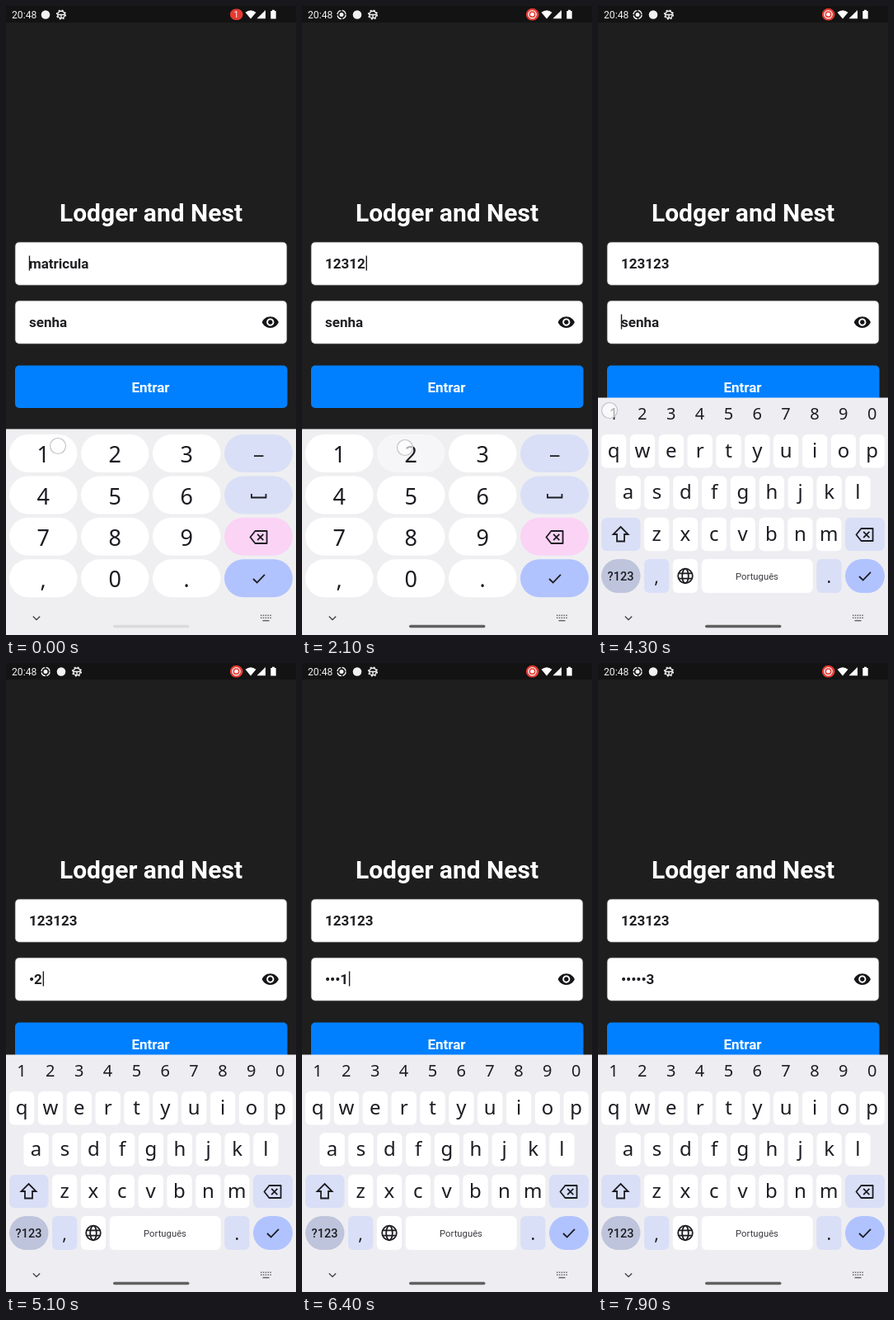
An HTML page that plays this animation: 352x762 px, repeating every 8 s.

```html
<!DOCTYPE html>
<html lang="pt">
<head>
<meta charset="utf-8">
<title>Login</title>
<style>
  html, body { margin: 0; width: 100%; height: 100%; overflow: hidden; background: #1e1e1e; }
  svg { display: block; width: 352px; height: 762px; }
  text { font-family: Roboto, sans-serif; }
  .bold { font-weight: 700; font-size: 17px; fill: #1f1f23; }
  .key { font-family: "Noto Sans", sans-serif; fill: #1c1c22; text-anchor: middle; }
  .mid { text-anchor: middle; }
  .line { fill: none; stroke: #1c1c22; stroke-width: 1.8; }
  .thin { fill: none; stroke: #f2f2f2; stroke-width: 1.4; }
</style>
</head>
<body>
<svg viewBox="0 0 352 762">
  <defs>
    <g id="back" class="line">
      <path d="M-10.5 0L-4.5-7.5H9.6V7.5H-4.5Z" stroke-linejoin="round"/>
      <path d="M-1.8-3.6L5.4 3.6M5.4-3.6L-1.8 3.6"/>
    </g>
    <path id="check" class="line" d="M-7 .5L-2.3 5L7-4.7"/>
  </defs>

  <rect width="352" height="762" fill="#1e1e1e"/>
  <rect width="352" height="20" fill="#131313"/>

  <!-- status bar -->
  <text x="7" y="15" font-size="12.2" fill="#f2f2f2">20:48</text>
  <g id="recNote">
    <circle class="thin" cx="48" cy="10.5" r="5" stroke-dasharray="6.4 1.45"/>
    <circle cx="48" cy="10.5" r="2.5" fill="#f2f2f2"/>
  </g>
  <g id="notes">
    <circle cx="48" cy="10.5" r="5.3" fill="#f2f2f2"/>
    <g transform="translate(67 10.5)">
      <circle class="thin" r="4.3"/>
      <circle class="thin" r="5.4" stroke-dasharray="2.1 2.14"/>
      <path class="thin" d="M-4 0H4M0 0V4" stroke-width="1.1"/>
    </g>
  </g>
  <rect x="272" y="3.5" width="15.5" height="13.5" rx="6.7" fill="#e53a32"/>
  <text id="count" class="mid" x="279.5" y="14" font-size="10.5" fill="#fff">1</text>
  <g id="recChip">
    <circle cx="279.5" cy="10.2" r="7.4" fill="#e53a32"/>
    <circle class="thin" cx="279.5" cy="10.2" r="4.6" stroke-width="1.1"/>
    <circle cx="279.5" cy="10.2" r="2.4" fill="#fff"/>
  </g>
  <path d="M290.5 7.8Q297 2.8 303.5 7.8L297 15.6ZM304.5 15.3L315 5V15.3ZM321.3 6H323V4.8H326V6H327.7V15.6H321.3Z" fill="#fff"/>

  <!-- form -->
  <text class="mid" x="176" y="260.5" font-size="30" font-weight="700" fill="#fff">Lodger and Nest</text>
  <g fill="#fff" stroke="#4b4b4b" stroke-width=".7">
    <rect x="11" y="286" width="330" height="52.3" rx="5"/>
    <rect x="11" y="357" width="330" height="52.3" rx="5"/>
  </g>
  <text id="user" class="bold" x="28" y="318"></text>
  <text id="pass" class="bold" x="28" y="389"></text>
  <rect id="caret" width="1.4" height="18" fill="#1c1c20"/>
  <path transform="translate(309.8 372) scale(.92)" fill="#151518" d="M12 4.5C7 4.5 2.73 7.61 1 12c1.73 4.39 6 7.5 11 7.5s9.27-3.11 11-7.5c-1.73-4.39-6-7.5-11-7.5zM12 17c-2.76 0-5-2.24-5-5s2.24-5 5-5 5 2.24 5 5-2.24 5-5 5zm0-8c-1.66 0-3 1.34-3 3s1.34 3 3 3 3-1.34 3-3-1.34-3-3-3z"/>
  <rect x="11" y="435.5" width="330.5" height="51.5" rx="5" fill="#0080ff"/>
  <text class="bold mid" x="175.5" y="468" style="fill:#fff">Entrar</text>

  <!-- keyboards -->
  <g id="numPad"><rect y="512.5" width="352" height="250" fill="#efeff1"/></g>
  <g id="letters"><rect y="474.5" width="352" height="288" fill="#eeeef2"/></g>

  <!-- navigation -->
  <path d="M32.8 739.5L37 743.5L41.2 739.5" fill="none" stroke="#47474c" stroke-width="1.4"/>
  <g stroke="#66666b" stroke-width="1.5">
    <path d="M309 738.3H322M309 741.3H322" stroke-dasharray="1.5 1.35"/>
    <path d="M311.5 744.6H319.5"/>
  </g>
  <rect id="pill" x="130" y="749.8" width="92.5" height="3.4" rx="1.7"/>

  <circle id="touch" r="9.5" fill="#fff" fill-opacity=".65" stroke="#c4c4c8" stroke-width="1.2"/>
</svg>

<script>
const $ = id => document.getElementById(id);
const LAVENDER = '#d9dff6', BLUE = '#b1c3ff', PINK = '#fbd3f5';

function add(parent, tag, attrs, text) {
  const node = document.createElementNS('http://www.w3.org/2000/svg', tag);
  for (const name in attrs) node.setAttribute(name, attrs[name]);
  if (text) node.textContent = text;
  parent.append(node);
  return node;
}
const box = (g, x, y, width, height, rx, fill = '#fff') =>
  add(g, 'rect', { x, y, width, height, rx, fill });
const glyph = (g, x, y, size, text) =>
  add(g, 'text', { class: 'key', x, y, 'font-size': size }, text);
const icon = (g, href, x, y) => add(g, 'use', { href, x, y });
const line = (g, d) => add(g, 'path', { class: 'line', d });

function buildNumPad(g) {
  const keys = {};
  ['123', '456', '789', ',0.'].forEach((row, r) => {
    const y = 519 + r * 50.4;
    [...row].forEach((ch, c) => {
      keys[ch] = box(g, 4 + c * 87, y, 82.5, 46, 23);
      glyph(g, 45.2 + c * 87, y + 34.2, 27, ch);
    });
    box(g, 265, y, 83, 46, 23, [LAVENDER, LAVENDER, PINK, BLUE][r]);
  });
  line(g, 'M301 545.2H312.5M298 591V595.5H315.5V591');
  icon(g, '#back', 307, 643.5);
  icon(g, '#check', 307, 693.5);
  return keys;
}

function buildLetters(g) {
  const step = 34.85;
  [...'1234567890'].forEach((ch, i) => glyph(g, 19 + i * step, 501.3, 20, ch));
  [['qwertyuiop', 4, 519], ['asdfghjkl', 21.5, 569.3], ['zxcvbnm', 56, 619.7]]
    .forEach(([row, x, y]) => [...row].forEach((ch, i) => {
      box(g, x + i * step, y, 30.3, 40.5, 6);
      glyph(g, x + 15.1 + i * step, y + 28, 24, ch);
    }));

  box(g, 4, 619.7, 47.5, 40.5, 7, LAVENDER);
  line(g, 'M27.5 631L36.5 640H32V648.5H23V640H18.5Z');
  box(g, 300, 619.7, 48, 40.5, 7, LAVENDER);
  icon(g, '#back', 324, 640.5);

  box(g, 4, 670, 47.5, 41, 20.5, '#bec4db');
  add(g, 'text', { class: 'mid', x: 27.5, y: 696, 'font-size': 14.5, 'font-weight': 500, fill: '#1c1c22' }, '?123');
  box(g, 56, 670, 30.3, 41, 6, LAVENDER);
  glyph(g, 71, 699, 21, ',');
  box(g, 90.8, 670, 30.3, 41, 6);
  add(g, 'circle', { class: 'line', cx: 106, cy: 690.5, r: 8.8 });
  add(g, 'ellipse', { class: 'line', cx: 106, cy: 690.5, rx: 3.8, ry: 8.8 });
  line(g, 'M98 687.3H114M98 693.7H114');
  box(g, 125.7, 670, 135, 41, 6);
  add(g, 'text', { class: 'mid', x: 193, y: 695, 'font-size': 11.3, fill: '#3a3a40' }, 'Português');
  box(g, 265.3, 670, 30.3, 41, 6, LAVENDER);
  glyph(g, 280.4, 699, 21, '.');
  box(g, 300, 670, 48, 41, 20.5, BLUE);
  icon(g, '#check', 324, 690.5);
}

const keys = buildNumPad($('numPad'));
buildLetters($('letters'));

const LOOP = 8000, FOCUS = 3300, SWITCH = 3400;
const userTyped = [200, 900, 1100, 1600, 2100, 2500];
const passTyped = [4400, 4900, 5400, 6100, 6800, 7200];
// Spans with a visible caret: [from, to]
const caretOn = [[0, 800], [900, 1600], [1600, 3000], [FOCUS, 3800], [4300, 5900], [6100, 6600], [6800, 7700]];
// Touches: [start, x, y, number key]
const touches = [
  [0, 63, 533, '1'], [800, 125, 535, '2'], [1000, 202, 535, '3'],
  [1500, 50, 535, '1'], [2000, 125, 535, '2'], [2400, 210, 535, '3'],
  [3100, 163, 383], [4300, 14, 490], [4800, 50, 492], [5300, 86, 492],
  [6000, 14, 490], [6700, 50, 492], [7100, 86, 492]
];

const clamp = v => Math.max(0, Math.min(1, v));
const show = (id, on) => $(id).setAttribute('visibility', on ? 'visible' : 'hidden');
const countAt = (times, t) => times.filter(at => t >= at).length;
const digits = n => '123123'.slice(0, n);

function drawText(t) {
  const n = countAt(userTyped, t), m = countAt(passTyped, t);
  const user = $('user'), pass = $('pass');
  user.textContent = n ? digits(n) : 'matricula';
  pass.textContent = m ? '•'.repeat(m - 1) + digits(m).slice(-1) : 'senha';

  const onPass = t >= FOCUS;
  const typed = onPass ? m : n;
  const width = typed ? (onPass ? pass : user).getComputedTextLength() + 1 : 0;
  $('caret').setAttribute('x', 27.8 + width);
  $('caret').setAttribute('y', onPass ? 373.5 : 302.5);
  show('caret', caretOn.some(([from, to]) => t >= from && t < to));
}

function drawTouch(t) {
  const [at, x, y, key] = touches.filter(([start]) => t >= start).pop();
  const age = t - at;
  const dot = $('touch');
  dot.setAttribute('cx', x);
  dot.setAttribute('cy', y);
  dot.setAttribute('opacity', clamp(1 - (age - 100) / 140));
  for (const k of '123')
    keys[k].setAttribute('fill', k === key && age >= 100 && age < 200 ? '#f6f6f8' : '#fff');
}

function draw(t) {
  const recording = t >= 200;
  show('recNote', recording);
  show('recChip', recording);
  show('count', !recording);
  $('notes').setAttribute('transform', `translate(${recording ? 19 : 0} 0)`);
  const grey = Math.round(218 - 122 * clamp((t - 100) / 200));
  $('pill').setAttribute('fill', `rgb(${grey},${grey},${grey})`);
  show('numPad', t < SWITCH);
  show('letters', t >= SWITCH);
  drawText(t);
  drawTouch(t);
}

const begin = performance.now();
function tick() {
  draw((performance.now() - begin) % LOOP);
  requestAnimationFrame(tick);
}
tick();
</script>
</body>
</html>
```
